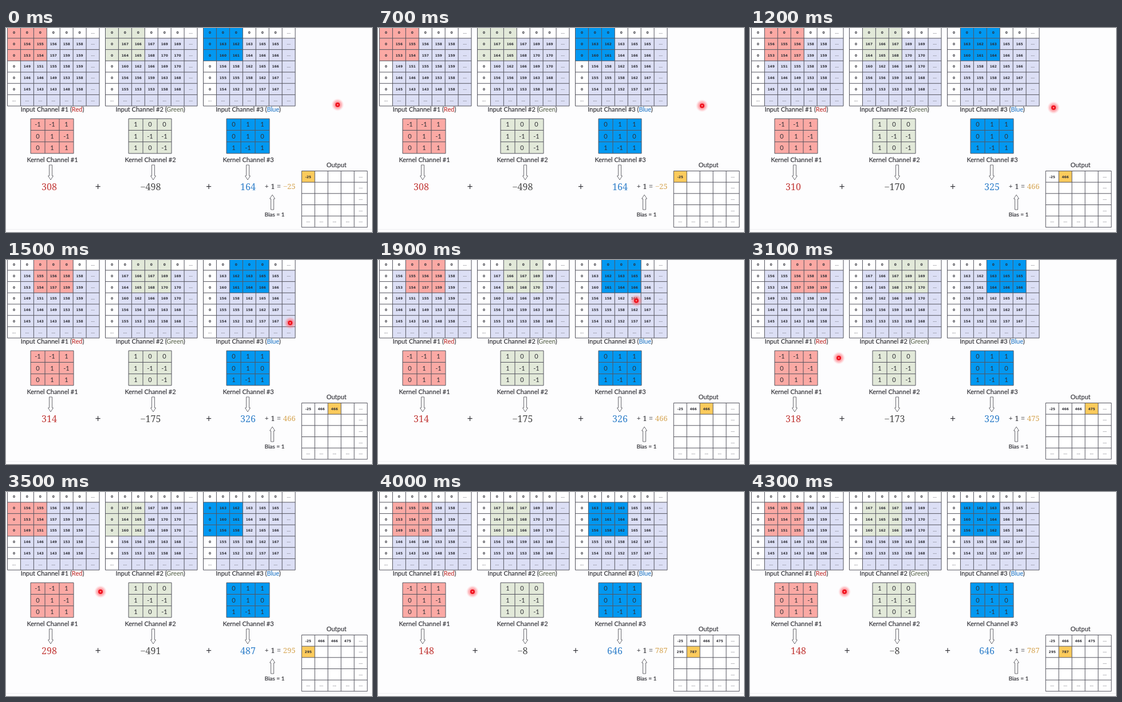
Write an HTML page that moves like this. It is 639 px wide and 356 px high and loops after 4.4 s.

```html
<!DOCTYPE html>
<html lang="en">
<head>
<meta charset="utf-8">
<title>Convolution over three channels</title>
<style>
  html, body { margin: 0; width: 100%; height: 100%; overflow: hidden; background: #fff; }
  svg { display: block; width: 100%; height: 100%; }
  text { font-family: Lato, "Open Sans", sans-serif; fill: #303036; text-anchor: middle; }
  .cell { font: bold 5.8px "DejaVu Sans", sans-serif; fill: #2c2c34; }
  .dots { fill: #777780; }
  .weight { font-size: 11px; }
  .caption { font-size: 11px; stroke: #303036; stroke-width: .15; }
  .bias { font-size: 10px; stroke: #303036; stroke-width: .2; }
  .sum { font: 16px "Noto Serif", serif; }
  .plus { font: 19px "Noto Serif", serif; }
  .total { font: 13px "Noto Serif", serif; }
  .grid { fill: none; stroke: #55555f; stroke-width: 1; }
  .arrow { fill: #fff; stroke: #6c6c72; stroke-width: 1; }
</style>
</head>
<body>
<svg id="stage" viewBox="0 0 639 356">
  <defs>
    <radialGradient id="glow">
      <stop offset="0" stop-color="#ff4050" stop-opacity=".8"/>
      <stop offset=".6" stop-color="#ff7078" stop-opacity=".5"/>
      <stop offset="1" stop-color="#ffa0a8" stop-opacity="0"/>
    </radialGradient>
  </defs>
</svg>
<script>
const LOOP = 4400, STEP = 100;
const CELL_W = 22.93, CELL_H = 19.7, TOP = -1.8;

const channels = [
  { name: 'Red', x: 2.5, tint: '#fba9a4', ink: '#c23a38', arrowX: 78,
    rows: ['156 155 156 158 158', '153 154 157 159 159', '149 151 155 158 159',
           '146 146 149 153 158', '145 143 143 148 158'],
    kernel: [[-1, -1, 1], [0, 1, -1], [0, 1, 1]] },
  { name: 'Green', x: 173.5, tint: '#e2e9d9', ink: '#66705a', arrowX: 257,
    rows: ['167 166 167 169 169', '164 165 168 170 170', '160 162 166 169 170',
           '156 156 159 163 168', '155 153 153 158 168'],
    kernel: [[1, 0, 0], [1, -1, -1], [1, 0, -1]] },
  { name: 'Blue', x: 344.5, tint: '#0298f1', ink: '#2f7fca', arrowX: 422,
    rows: ['163 162 163 165 165', '160 161 164 166 166', '156 158 162 165 166',
           '155 155 158 162 167', '154 152 152 157 167'],
    kernel: [[0, 1, 1], [0, 1, 0], [1, -1, 1]] }
];

// Window positions: start time, row, column
const windows = [[0, 0, 0], [800, 0, 1], [1500, 0, 2], [2200, 0, 3], [3300, 1, 0], [4000, 1, 1]];

// Laser pointer: time, x, y
const pointerPath = [[0, 579, 134], [600, 573, 135], [1200, 530, 139], [1900, 451, 71],
  [2300, 47, 19], [3100, 155, 171], [3500, 165, 174], [LOOP, 165, 174]];

const stage = document.getElementById('stage');

function add(tag, attrs, content = '') {
  const node = document.createElementNS('http://www.w3.org/2000/svg', tag);
  for (const key in attrs) node.setAttribute(key, attrs[key]);
  node.textContent = content;
  return stage.appendChild(node);
}
const rect = (x, y, width, height, fill) => add('rect', { x, y, width, height, fill });
const label = (x, y, cls, content, style = '') => add('text', { x, y, class: cls, style }, content);

function grid(x, y, cols, rows, w, h) {
  let d = '';
  for (let c = 0; c <= cols; c++) d += `M${x + c * w} ${y}v${rows * h}`;
  for (let r = 0; r <= rows; r++) d += `M${x} ${y + r * h}h${cols * w}`;
  add('path', { d, class: 'grid' });
}

function arrow(x, y, dir) {
  const d = `M${x - 2.5} ${y}v${dir * 19}h-2l4.5 ${dir * 7}l4.5 ${-dir * 7}h-2v${-dir * 19}z`;
  add('path', { d, class: 'arrow' });
}

function cellText(x, y, value) {
  const dots = value === '...';
  label(x, y + (dots ? 1.5 : 2.2), dots ? 'cell dots' : 'cell', value);
}

function drawChannel(ch, index) {
  const { x, kernel } = ch;
  ch.data = [Array(6).fill(0), ...ch.rows.map(r => [0, ...r.split(' ').map(Number)])];

  rect(x, TOP, 7 * CELL_W, 7 * CELL_H, '#fff');
  rect(x + CELL_W, TOP + CELL_H, 6 * CELL_W, 6 * CELL_H, '#dcdff5');
  ch.window = rect(x, TOP, 3 * CELL_W, 3 * CELL_H, ch.tint);
  grid(x, TOP, 7, 7, CELL_W, CELL_H);
  for (let r = 0; r < 7; r++)
    for (let c = 0; c < 7; c++)
      cellText(x + (c + .5) * CELL_W, TOP + (r + .5) * CELL_H,
        r === 6 || c === 6 ? '...' : ch.data[r][c]);

  const title = label(x + 78.5, 146, 'caption', `Input Channel #${index + 1} (`);
  const word = add('tspan', { style: `fill:${ch.ink};stroke:${ch.ink}` }, ch.name);
  title.append(word, ')');

  const kx = x + 40.5, ky = 158.3, kw = 25, kh = 20.2;
  rect(kx, ky, 3 * kw, 3 * kh, ch.tint);
  grid(kx, ky, 3, 3, kw, kh);
  kernel.forEach((row, r) => row.forEach((v, c) =>
    label(kx + (c + .5) * kw, ky + (r + .5) * kh + 4, 'weight', v)));
  label(x + 78.5, 234, 'caption', `Kernel Channel #${index + 1}`);
  arrow(ch.arrowX, 239, 1);
}

const convolve = (ch, row, col) => ch.kernel.flat().reduce((sum, k, i) =>
  sum + k * ch.data[row + Math.floor(i / 3)][col + i % 3], 0);

const signed = n => String(n).replace('-', '−');

rect(0, 0, 639, 356, '#fdfdfe');
rect(0, 351, 639, 1, '#efeff1');
channels.forEach(drawChannel);

const sums = channels.map((ch, i) =>
  label(0, 282.5, 'sum', '', `fill:${i === 1 ? '#4a4a4a' : ch.ink}`));
const pluses = [0, 1].map(() => label(0, 284, 'plus', '+'));
label(451.5, 280.5, 'total', '+ 1 =', 'text-anchor:start');
const total = label(505.5, 280.5, 'total', '', 'fill:#d6a552;text-anchor:end');
arrow(465, 317, -1);
label(469, 329, 'bias', 'Bias = 1');

const OUT_X = 516.2, OUT_Y = 249.5, OUT_H = 19.65;
rect(OUT_X, OUT_Y, 5 * CELL_W, 5 * OUT_H, '#fff');
label(577, 243, 'caption', 'Output');
const marker = rect(0, 0, CELL_W, OUT_H, '#fccb5c');
grid(OUT_X, OUT_Y, 5, 5, CELL_W, OUT_H);
for (let i = 0; i < 5; i++) {
  cellText(OUT_X + 4.5 * CELL_W, OUT_Y + (i + .5) * OUT_H, '...');
  if (i < 4) cellText(OUT_X + (i + .5) * CELL_W, OUT_Y + 4.5 * OUT_H, '...');
}
const states = windows.map(([start, row, col]) => {
  const parts = channels.map(ch => convolve(ch, row, col));
  const result = parts.reduce((a, b) => a + b, 1);
  const out = label(OUT_X + (col + .5) * CELL_W, OUT_Y + (row + .5) * OUT_H + 2.2, 'cell', result);
  return { start, row, col, parts, result, out };
});

const pointer = add('g', {});
pointer.append(
  add('circle', { r: 11, fill: 'url(#glow)' }),
  add('circle', { r: 4, fill: '#f0141f' }),
  add('circle', { r: 1.3, fill: '#ff8f90' }));

function place(node, x, y) {
  node.setAttribute('x', x);
  if (y !== undefined) node.setAttribute('y', y);
}

function showState(t) {
  const now = states.filter(s => s.start <= t).pop();
  for (const s of states) s.out.style.display = s.start <= t ? '' : 'none';
  for (const ch of channels)
    place(ch.window, ch.x + now.col * CELL_W, TOP + now.row * CELL_H);
  place(marker, OUT_X + now.col * CELL_W, OUT_Y + now.row * OUT_H);

  // The equation stays centred, so a shorter middle term pulls the rest inward.
  const pull = 4.5 * (4 - signed(now.parts[1]).length);
  [75.5 + pull, 252.5, 422.5 - pull].forEach((x, i) => {
    place(sums[i], x);
    sums[i].textContent = signed(now.parts[i]);
  });
  place(pluses[0], 160.5 + pull);
  place(pluses[1], 354 - pull);
  total.textContent = signed(now.result);
}

function movePointer(t) {
  const i = pointerPath.findIndex(p => p[0] > t);
  const [t0, x0, y0] = pointerPath[i - 1], [t1, x1, y1] = pointerPath[i];
  const k = (t - t0) / (t1 - t0);
  pointer.setAttribute('transform', `translate(${x0 + (x1 - x0) * k} ${y0 + (y1 - y0) * k})`);
}

function render() {
  const t = Math.floor(performance.now() % LOOP / STEP) * STEP;
  showState(t);
  movePointer(t);
  requestAnimationFrame(render);
}
render();
</script>
</body>
</html>
```
